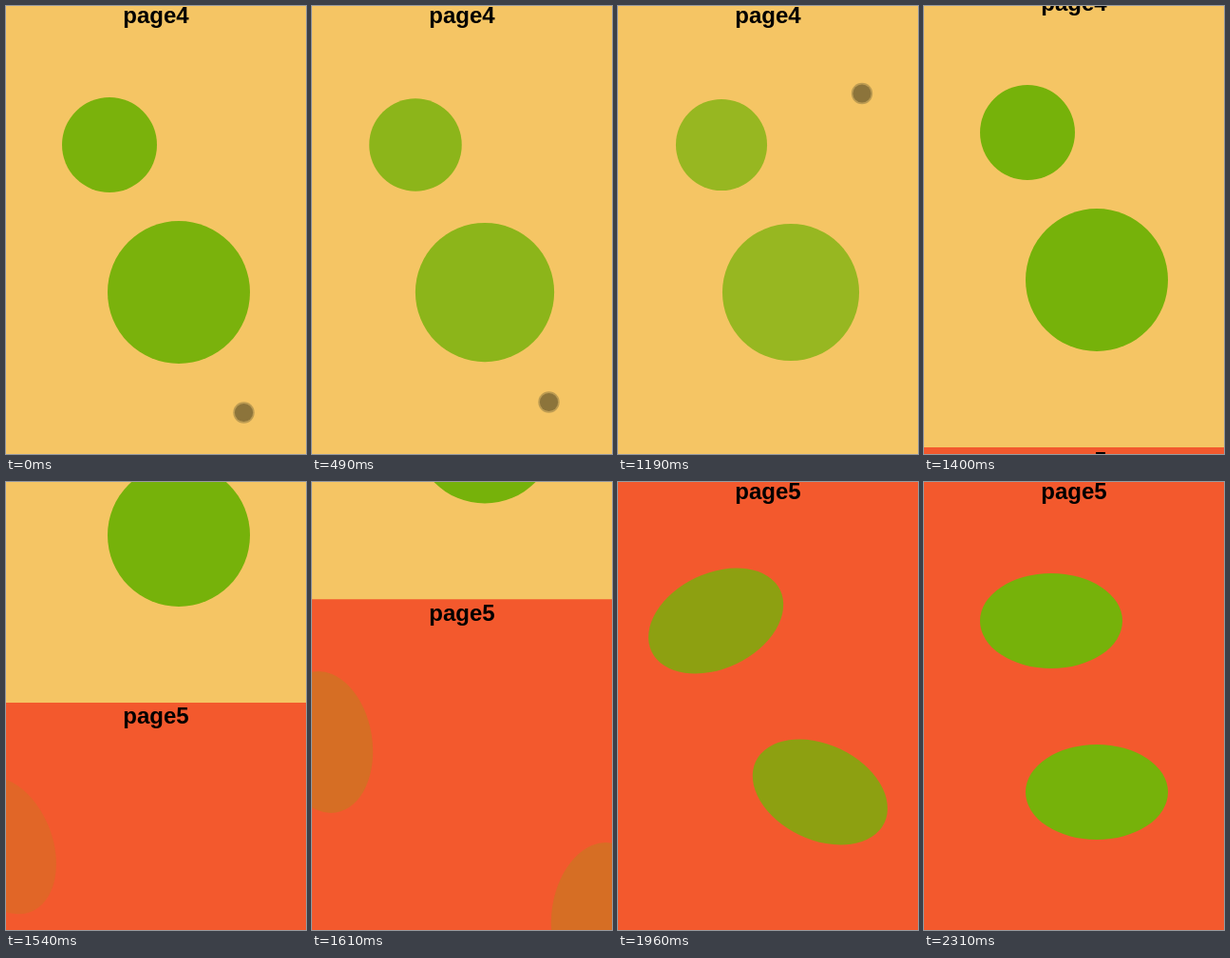
Animation of 316 by 471 pixels, one loop 4900 ms. Source, as an HTML page:

```html
<!DOCTYPE html>
<html lang="en">
<head>
<meta charset="utf-8">
<title>Page swipe</title>
<style>
html, body { margin: 0; width: 100%; height: 100%; overflow: hidden; background: #f3592d; }
svg { display: block; width: 316px; height: 471px; }
text { font: bold 24px "Liberation Sans", Arial, sans-serif; text-anchor: middle; }
</style>
</head>
<body>
<svg viewBox="0 0 316 471">
  <g id="page4">
    <rect width="316" height="481" fill="#f5c564"/>
    <text x="158" y="22">page4</text>
    <g id="discs" fill="#76b20a">
      <circle cx="109" cy="150" r="50"/>
      <circle cx="182" cy="305" r="75"/>
    </g>
  </g>
  <g id="page5">
    <rect width="316" height="481" fill="#f3592d"/>
    <text x="158" y="22">page5</text>
    <g id="ovals" fill="#76b20a">
      <ellipse rx="75" ry="50"/>
      <ellipse rx="75" ry="50"/>
    </g>
  </g>
  <g id="touch">
    <circle r="11.2" fill="#bd9c52"/>
    <circle r="9.6" fill="#8c743b"/>
  </g>
</svg>
<script>
const LOOP = 4900, STEP = 70, END = 2310;
const PAGE = 481, TOP = -4, RELEASE = 1260;
const $ = id => document.getElementById(id);
const clamp = v => Math.max(0, Math.min(1, v));

// CSS-style cubic bezier timing function
function bezier(x1, y1, x2, y2) {
  const at = (a, b, s) => 3 * (1 - s) ** 2 * s * a + 3 * (1 - s) * s * s * b + s ** 3;
  return x => {
    let lo = 0, hi = 1;
    for (let i = 0; i < 30; i++) {
      const mid = (lo + hi) / 2;
      if (at(x1, x2, mid) < x) lo = mid; else hi = mid;
    }
    return at(y1, y2, lo);
  };
}
const ease = bezier(.25, .1, .25, 1);
const easeInOut = bezier(.42, 0, .58, 1);

// Linear interpolation through [time, value] points
function track(t, points) {
  if (t <= points[0][0]) return points[0][1];
  for (let i = 1; i < points.length; i++) {
    const [ta, a] = points[i - 1], [tb, b] = points[i];
    if (t <= tb) return a + (b - a) * (t - ta) / (tb - ta);
  }
  return points[points.length - 1][1];
}

const slide = [[1377, 0], [1400, .0433], [1540, .298], [1750, .722], [1890, 1]];
const fingerX = [[0, 250.5], [490, 249.5], [700, 247], [910, 246.5], [1120, 251.5], [1190, 257]];
const fingerY = [[0, 427.5], [140, 434], [350, 433], [490, 416.5], [560, 363],
                 [910, 177.5], [1120, 109], [1190, 92]];
const ovals = [[134, 150, -1], [182, 330, 1]];

function draw(t) {
  const top = TOP - PAGE * ease(track(t, slide));
  $("page4").setAttribute("transform", `translate(0 ${top})`);
  $("page5").setAttribute("transform", `translate(0 ${top + PAGE})`);

  // Discs pulse while the finger is down
  const held = t < RELEASE;
  const pulse = held ? 1 - Math.abs(t - 980) / 980 : 0;
  for (const disc of $("discs").children) {
    const base = disc.dataset.r ||= disc.getAttribute("r");
    disc.setAttribute("r", base * (1 - .05 * pulse));
    disc.setAttribute("opacity", held ? .97 - .294 * pulse : 1);
  }

  // Ovals spin in from both sides
  const p = easeInOut(clamp((t - 1280) / 980));
  ovals.forEach(([x, y, side], i) => {
    const oval = $("ovals").children[i], left = side * (1 - p);
    oval.setAttribute("transform", `translate(${x + 158 * left} ${y}) rotate(${130 * left})`);
    oval.setAttribute("opacity", p);
  });

  $("touch").setAttribute("transform", `translate(${track(t, fingerX)} ${track(t, fingerY)})`);
  $("touch").setAttribute("visibility", held ? "visible" : "hidden");
}

function frame() {
  const t = performance.now() % LOOP;
  draw(Math.min(END, Math.floor(t / STEP) * STEP));
  requestAnimationFrame(frame);
}
frame();
</script>
</body>
</html>
```
